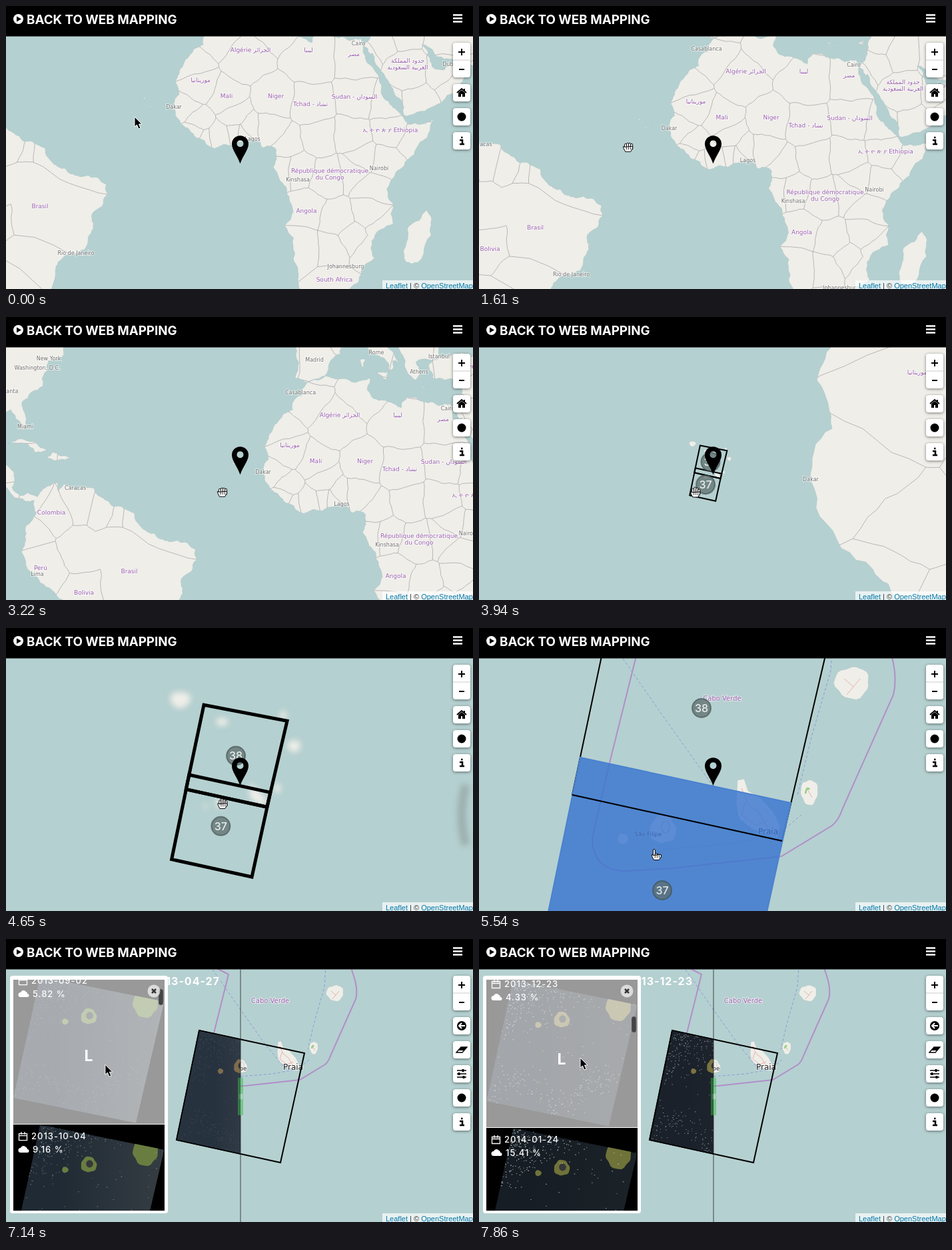
Recreate the animation shown at these times as an HTML page. Size 701x424 px, loop 8 s.

```html
<!DOCTYPE html>
<html lang="en">
<head>
<meta charset="utf-8">
<title>Web mapping</title>
<style>
html, body { margin: 0; width: 100%; height: 100%; overflow: hidden; background: #b5d0d0; }
svg { display: block; }
text { font-family: "DejaVu Sans", "Noto Sans", sans-serif; }
.ui { font-family: Inter, "Open Sans", sans-serif; fill: #fff; }
.label { text-anchor: middle; paint-order: stroke; stroke: #fff; stroke-opacity: .6; stroke-width: 2px; }
#view path, #feet path { vector-effect: non-scaling-stroke; }
.land { fill: #efeee9; stroke: #a9c3c3; stroke-width: .5; }
.border { fill: none; stroke: #a3a09f; stroke-width: .7; }
.limit { fill: none; stroke: #b08fc9; stroke-width: 2; }
.ferry { fill: none; stroke: #8b9cdc; stroke-width: 1; stroke-dasharray: 4 3; }
.road { fill: none; stroke: #e3a59c; stroke-width: .8; }
.button { fill: #fff; filter: drop-shadow(0 1px 2px rgba(0,0,0,.5)); }
.icon { fill: none; stroke: #000; stroke-width: 2; }
.attr { font: 11px "Liberation Sans", Arial, sans-serif; }
</style>
</head>
<body>
<svg id="stage" width="701" height="424" viewBox="0 0 701 424"></svg>
<script>
const LOOP = 8000, STEP = 178.6;
const $ = id => document.getElementById(id);
const show = (id, on) => $(id).setAttribute("display", on ? "inline" : "none");
const mix = (a, b, p) => a + (b - a) * p;
const progress = (t, from, to) => Math.min(1, Math.max(0, (t - from) / (to - from)));

function random(seed) {
  return () => (seed = seed * 16807 % 2147483647) / 2147483647;
}

// World map: key points in degrees, projected to pixels of the widest zoom
const DEG = 2048 / 360;
function project(lon, lat) {
  const north = Math.log(Math.tan(Math.PI / 4 + lat * Math.PI / 360)) * 180 / Math.PI;
  return [351 + DEG * lon, 237 - DEG * north];
}
function points(text) {
  const n = text.split(" ").map(Number);
  return n.flatMap((v, i) => i % 2 ? [] : [project(v, n[i + 1])]);
}
const rnd = random(4242);
function rough(a, b, amp, depth = 3) {
  const dx = b[0] - a[0], dy = b[1] - a[1];
  if (!depth || Math.hypot(dx, dy) < 4) return [a];
  const k = (rnd() - .5) * amp;
  const mid = [(a[0] + b[0]) / 2 - dy * k, (a[1] + b[1]) / 2 + dx * k];
  return [...rough(a, mid, amp, depth - 1), ...rough(mid, b, amp, depth - 1)];
}
const path = list => "M" + list.map(p => p.map(v => v.toFixed(1)).join(" ")).join("L");

const coasts = {
  africa: `-6 35.8 -9.7 31.5 -9.6 30 -12.9 27.9 -16 23.7 -17 21 -16 18 -17.4 14.7 -16.8 12.4 -13.3 9 -11.5 6.9 -7.6 4.4 -4 5.2 -2 4.8 1 5.9 4.4 6.3 6 4.3 8.5 4.6 9.6 3.8 9.3 .5 8.8 -.8 12.2 -6 13.8 -11 11.8 -16 14.5 -22.8 15.3 -27 18.3 -34 20 -34.8 25.7 -34 31 -29.9 32.8 -26 35.5 -24 34.8 -19.8 40.5 -15.5 40.5 -10.5 38.8 -6.5 41.5 -1.8 46 2.5 49.5 7 51.2 11.8 44.5 10.4 43 12.5 39.6 15.5 37.3 19 35.5 24 32.6 29.8 32 31.3 29 30.9 25 31.7 20.5 32.8 19 30.4 15.5 31.8 11 33.3 10.2 34.2 10.8 37 3 36.8`,
  asia: `34.3 31.3 36 36.7 30.5 36.5 27.5 36.8 26.3 39.8 29 41 33 42 41 41.3 41 50 70 50 70 26 61 25.2 57 26 54 26.6 51 28.5 48 30 50.2 26.6 51.5 24.3 54 24.1 56.3 26 56.6 24.3 59.7 22.5 57.8 19 52.2 15.6 45 12.8 43.4 12.7 42.7 16.5 39.1 21.5 35 28 34.3 27.8 32.7 29.8`,
  europe: `29 41 26 40.8 23 40.3 24 38 23 36.5 21.3 37.5 19.5 41.5 14 45 12.3 45 13.6 43.5 18.4 40.2 16.8 40.5 17 39 15.8 38 15.7 40 12.5 41.6 8.8 44.4 6 43.1 3.1 43 3 41.8 -.2 39.3 -.5 38 -2 36.8 -5.5 36 -9 37 -8.8 43.2 -1.5 43.5 -1.5 48 29 48`,
  south: `-77 8.5 -75.5 10.5 -71.7 12.2 -71.5 10 -70 11.8 -62 10.7 -60 8.3 -57 6 -51.5 4.3 -50 1 -48 -.7 -44.5 -2.6 -40 -2.9 -35.3 -5.3 -34.9 -8 -39 -13 -39.2 -17.8 -41 -22 -44.5 -23.1 -48.5 -26 -52 -33 -70.5 -38 -70.3 -18.3 -76.2 -14 -81.2 -6 -80 -3 -80 .8 -77.3 4 -77.8 7.5 -80 7.3 -83 8.3 -87.5 13 -95 16 -95 18.5 -88 18 -83.3 15 -83.7 11 -81 8.8 -79.5 9.6`,
  north: `-67 45 -70 43.5 -70 41.6 -74 40.5 -75.7 37 -75.5 35.2 -81 31.8 -80 26.5 -80.6 25.2 -82.7 28 -84 30 -90 29.3 -97 28 -97 50 -67 50`,
  madagascar: "49.3 -12 50.5 -15.8 47 -25 44 -25 43.3 -22 44.4 -16.3",
  cuba: "-84.9 21.9 -82 23.1 -74.3 20.2 -77.7 19.9 -78 20.8",
  hispaniola: "-74.4 18.4 -73 19.9 -68.4 18.6 -71.5 17.8",
  sicily: "12.5 38 15.6 38.2 15.1 36.7", sardinia: "8.2 40.8 9.6 40.8 9 39",
  crete: "23.6 35.4 26.3 35.2 24.8 34.9", cyprus: "32.3 35 34.5 35.6 33.5 34.7"
};
const land = Object.values(coasts).map(text => {
  const p = points(text);
  return path(p.flatMap((a, i) => rough(a, p[(i + 1) % p.length], .3))) + "Z";
}).join("");

// Borders run halfway between the centres of neighbouring countries
const centres = {
  maghreb: "-6 32,-13 25,-11 20,1.5 27,9.5 34,18.5 27,31.5 27",
  sahel: "-4 17,9 16,18.5 15,31.5 17,38.5 15.5",
  west: "-14.5 14.5,-11 11,-12 8.5,-9.5 6.5,-5.5 7.5,-1 8,1 8,2.4 9,-1.5 12.5,8 9.5,12.5 5.5",
  east: "20.5 7,30 7.5,39.5 9,46 6,38 .5,32.5 1.5,35 -6.5,30 -2",
  south: "23 -3,15.5 -1,11.5 -1,17.5 -12,26 -14.5,34 -13,37 -16.5 34 -22,30 -19,24 -22,17 -22,24 -30,47 -19",
  asia: "44 24,47 15.5,57 20.5,54.5 23.7,43 33,37 31,54 32,38.5 35,34 39",
  europe: "22 39,13 42,-4 40,-12.6 40,3 46",
  america: "-73 4,-66 7,-59 5,-56 4,-53 4,-78.5 -1.5,-75 -9,-66 -5 -56 -3 -55 -16,-64.5 -17,-58 -23,-64 -29,-80 8.5,-84 10,-85 13,-82 36"
};
const sites = Object.values(centres).join(",").split(",").flatMap((text, id) => points(text).map(p => ({ p, id })));

function cut(cell, a, b, n) {
  const side = ({ p }) => Math.hypot(p[0] - a[0], p[1] - a[1]) ** 2 - Math.hypot(p[0] - b[0], p[1] - b[1]) ** 2;
  return cell.flatMap((v, i) => {
    const w = cell[(i + 1) % cell.length], s = side(v), e = side(w), out = s <= 0 ? [v] : [];
    if (s <= 0 !== e <= 0) {
      const k = s / (s - e);
      out.push({ p: v.p.map((c, j) => mix(c, w.p[j], k)), n: s <= 0 ? n : v.n });
    }
    return out;
  });
}
const borders = sites.flatMap((site, i) => {
  let cell = [[-400, -200], [1000, -200], [1000, 700], [-400, 700]].map(p => ({ p, n: -1 }));
  sites.forEach((other, j) => { if (j !== i) cell = cut(cell, site.p, other.p, j); });
  return cell.flatMap((v, k) => {
    const end = cell[(k + 1) % cell.length].p;
    return v.n > i && sites[v.n].id !== site.id ? path([...rough(v.p, end, .15), end]) : [];
  });
}).join("");

// Local map units are pixels of the scene view
const local = (x, y) => [16 * x - 3048, 16 * y - 2226];
const limit = "M309 40L334 53 312 141 299 197Q299 222 325 222L359 220 441 211 479 188Q484 184 487 175L525 90Q528 78 524 62L517 40";
const ferries = "M306 40L350 103 390 159 420 195M480 40L478 72 464 120 453 165M352 206L400 202 438 195 456 180";
const foot = { 37: "M290 137L448 171 412 335 256 301Z", 38: "M318.7 1.3L480.6 32.4 441.5 199.5 284 165Z" };

function blob(cx, cy, rx, ry) {
  const ring = Array.from({ length: 28 }, (_, i) => {
    const a = i / 28 * 2 * Math.PI, r = 1 + .06 * Math.sin(3 * a + cx) + .04 * Math.sin(7 * a + cy);
    return [cx + rx * r * Math.cos(a), cy + ry * r * Math.sin(a)];
  });
  return path(ring) + "Z";
}
const fogo = blob(352, 191, 10, 10.5), brava = blob(322, 198, 4, 4);
const santiago = "M408 154L413 153 416 162 425 167 435 178 440 188 438 198 430 195 420 191 409 183 407 172Z";
const isles = fogo + brava + santiago + blob(462, 163, 6.5, 9.5) + blob(494, 81, 13, 12)
  + blob(273, -9, 20, 16) + blob(354, 34, 12, 8) + blob(473, 21, 7, 8);

const countries = [[367, 67, "Algérie الجزائر"], [454, 67, "ليبيا"], [522, 73, "مصر"], [603, 83, "حدود المملكة"], [603, 93, "العربية السعودية"],
  [292, 112, "موريتانيا"], [331, 136, "Mali"], [405, 136, "Niger"], [457, 148, "Tchad - تشاد"], [523, 137, "Sudan - السودان"],
  [577, 187, "ኢ ት ዮ ጵ ያ Ethiopia"], [486, 248, "République démocratique"], [486, 258, "du Congo"], [451, 308, "Angola"], [493, 411, "South Africa"],
  [51, 301, "Brasil"], [-17, 333, "Bolivia"], [-82, 296, "Perú"], [-66, 213, "Colombia"], [554, -6, "Türkiye"]];
const cities = [[529, 57, "Cairo"], [667, 88, "Dubai"], [252, 152, "Dakar"], [370, 200, "Lagos"], [560, 244, "Nairobi"], [438, 261, "Kinshasa"],
  [105, 371, "Rio de Janeiro"], [510, 391, "Johannesburg"], [329, -16, "Madrid"], [422, -27, "Rome"], [516, -21, "Istanbul"], [486, 2, "Athens"],
  [308, 33, "Casablanca"], [-70, -18, "New York"], [-87, -4, "Washington, D.C."], [-105, 84, "Miami"], [-30, 176, "Caracas"],
  [-87, 305, "Lima"], [-130, 31, "Atlanta"]];
const wide = (list, size, color) => list.map(([x, y, s]) => ({ p: local(x, y), s, size, color, wide: true }));
const labels = [
  ...wide(countries, 9, "#9a5fae"), ...wide(cities, 8, "#707070"),
  { p: [396.5, 93], s: "Cabo Verde", size: 10, color: "#a05fb0" },
  { p: [341, 195], s: "São Filipe", size: 8.5, color: "#222" },
  { p: [431, 193], s: "Praia", size: 12, color: "#222" }
];

// Satellite scenes
const scenes = [
  { date: "2013-04-27", cloud: "2.72", isle: "#7d6c4c", haze: .15 },
  { date: "2013-09-02", cloud: "5.82", isle: "#64803f", haze: .2 },
  { date: "2013-10-04", cloud: "9.16", isle: "#6a7d40", haze: .4 },
  { date: "2013-11-21", cloud: "7.05", isle: "#75763f", haze: .5 },
  { date: "2013-12-23", cloud: "4.33", isle: "#7a7440", haze: .6 },
  { date: "2014-01-24", cloud: "15.41", isle: "#6f7339", haze: .7 }
];
function clouds(seed) {
  const next = random(seed * 977 + 31);
  let d = "";
  for (let i = 0; i < 3500; i++) {
    const x = 256 + 192 * next(), y = 137 + 198 * next();
    const north = 1.2 - (x - 256 + 1.6 * (y - 137)) / 150;
    const south = .5 - Math.abs(y - 290 - 18 * Math.sin(x / 17)) / 50;
    if (Math.max(north, south, .03) > next()) d += `M${x.toFixed(1)} ${y.toFixed(1)}h${(.7 + next()).toFixed(1)}`;
  }
  return d;
}
const scene = (s, i) => `<g clip-path="url(#foot)">
  <path d="${foot[37]}" fill="hsl(212 24% ${20 - 1.7 * i}%)"/><path d="${foot[37]}" fill="url(#sheen)" opacity="${1 - .17 * i}"/>
  <path d="${fogo}${brava}${blob(424, 175, 16, 17)}" fill="${s.isle}"/>
  <ellipse cx="353" cy="190" rx="4.500" ry="5" fill="#35373a"/>
  <path d="${clouds(i + 1)}" stroke="#cfd8d4" opacity="${s.haze}"/></g>`;

const thumb = (s, i) => `<g transform="translate(0 ${222 * i})">
  <rect x="11" y="61" width="227" height="221"/>
  <g transform="translate(11 61) scale(1.18 1.11) translate(-256 -137)">${scene(s, i)}</g>
  <g id="over${i}"><rect x="11" y="61" width="227" height="221" fill="#fff" opacity=".6"/>
    <text class="ui" x="124" y="188" font-size="23" font-weight="700" text-anchor="middle">L</text></g>
  <rect x="11" y="282" width="227" height="1" fill="#fff"/>
  <g id="info${i}"><path d="M19.500 74.500h12v10h-12zM19.500 77.500h12M23 72v4M28 72v4" fill="none" stroke="#fff" stroke-width="1.300"/>
    <path d="M22 103a3.500 3.500 0 0 1 0-7a4.500 4.500 0 0 1 8-1a3 3 0 0 1 2 3a2.500 2.500 0 0 1 0 5z" fill="#fff"/>
    <g font-size="13" font-weight="500" letter-spacing="1"><text x="38" y="83" class="ui">${s.date}</text>
    <text x="40" y="103" class="ui">${s.cloud} %</text></g></g></g>`;

const icons = {
  home: `<path d="M-7 0L0-6 7 0M4-6v3"/><path d="M-5 0L0-4 5 0V6H1V2H-1V6H-5z" fill="#000" stroke="none"/>`,
  dot: `<circle r="6.500" fill="#000" stroke="none"/>`,
  info: `<path d="M-3-1H1V5M-3 5H4M-1-5H1.500" stroke-width="2.500"/>`,
  back: `<circle r="7" fill="#000" stroke="none"/><path d="M5 0H-3M0-4L-4 0 0 4" stroke="#fff"/>`,
  eraser: `<path d="M-8 4L-1-4H8L1 4z" stroke-width="1.300"/><path d="M-5 1L-1-4H8L4 1z" fill="#000" stroke="none"/>`,
  sliders: `<path d="M-7-5H7M-7 0H7M-7 5H7" stroke-width="1.500"/><path d="M2-7v4M-4-2v4M3 3v4" stroke-width="3"/>`
};
const tools = names => names.map((n, i) => `<rect class="button" x="671" y="${117 + 36 * i}" width="26" height="26" rx="4"/>
  <g class="icon" transform="translate(684 ${130 + 36 * i})">${icons[n]}</g>`).join("");

const fingers = tops => tops.map((y, i) => `<rect x="${3 * i - 5}" y="${y}" width="3" height="${4 - y}" rx="1.500"/>`).join("")
  + `<path d="M-5 0L-7-1-7 1-4 7H4L7 2V-1z"/><path d="M-2 0v4M1 0v4M4 0v4" stroke-width=".8"/>`;
const cursors = {
  arrow: `<path d="M0 0V15L3.500 12 6 18 9 17 6.500 11H11z" fill="#000" stroke="#fff"/>`,
  open: fingers([-6, -8, -7, -5]),
  fist: fingers([-5, -6, -6, -5]),
  pointer: fingers([-9, -3, -2, -1])
};

$("stage").innerHTML = `
<defs>
  <clipPath id="foot"><path d="${foot[37]}"/></clipPath>
  <clipPath id="ground"><path d="${land}"/></clipPath>
  <clipPath id="left"><rect x="0" y="46" width="352" height="378"/></clipPath>
  <clipPath id="list"><rect x="11" y="61" width="227" height="346"/></clipPath>
  <linearGradient id="sheen"><stop offset=".3" stop-color="#8a8a80" stop-opacity="0"/><stop offset="1" stop-color="#8a8a80" stop-opacity=".3"/></linearGradient>
</defs>
<rect width="701" height="424" fill="#b5d0d0"/>
<g id="soft"><g id="view">
  <g transform="translate(-3048 -2226) scale(16)"><path class="land" d="${land}"/>
    <g clip-path="url(#ground)"><path class="border" d="${borders}"/></g></g>
  <path class="land" d="${isles}"/>
  <g id="detail"><path class="limit" d="${limit}"/><path class="ferry" d="${ferries}"/>
    <path class="road" d="M411 160L416 172 424 178 433 194M414 170L411 180 422 188 431 184M488 78L495 84 500 78M495 84L490 90M460 160L464 167"/>
    <path d="M459 164Q460 158 462 161" fill="none" stroke="#98cf82" stroke-width="2.500"/>
    <ellipse cx="354" cy="189" rx="3" ry="4.500" fill="none" stroke="#bbb" stroke-width=".6"/></g>
</g><path id="smear" d="M690 235Q678 280 690 325" fill="none" stroke="#8d9999" stroke-width="13" opacity=".6"/></g>
<g>${labels.map((l, i) => `<text id="l${i}" class="label" font-size="${l.size}" fill="${l.color}">${l.s}</text>`).join("")}</g>
<g id="feet"><path id="foot38" d="${foot[38]}" fill="none" stroke="#000"/><path id="foot37" d="${foot[37]}" fill-opacity=".8"/>
  <path id="edge38" d="M284 165L441.500 199.500" stroke="#000"/></g>
<g id="hero" clip-path="url(#left)"><g id="heroA">${scene(scenes[0], 0)}</g><g id="heroB">${scene(scenes[4], 4)}</g>
  <path d="${foot[37]}" fill="none" stroke="#000" stroke-width="1.500"/></g>
${[37, 38].map(n => `<g id="count${n}"><circle r="14" fill="#5e6d6e" fill-opacity=".75" stroke="#3f4b4c" stroke-opacity=".6" stroke-width="2"/>
  <text class="ui" y="6" font-size="16" font-weight="500" text-anchor="middle" opacity=".85">${n}</text></g>`).join("")}
<path id="pin" transform="translate(.5 -.8)" d="M351 237C347 225 338.500 216 338.500 207.500A12.500 12.500 0 0 1 363.500 207.500C363.500 216 355 225 351 237ZM351 202a5 5 0 1 0 .01 0z" fill-rule="evenodd"/>
<g id="slider"><g id="split"><rect x="351" y="46" width="2" height="378" fill="#222"/>
  <rect x="348" y="208" width="8" height="56" fill="#1fb32e"/><rect x="348" y="208" width="3" height="56" fill="#43d34f"/>
  <path d="M350.500 232v8M352.500 232v8M354.500 232v8" stroke="#fff"/></g>
  <path id="arrows" d="M330 230v14l-8-7zM371 230v14l8-7z" fill="#fff"/></g>
<text id="title" class="ui" x="321" y="69" font-size="16" font-weight="700" letter-spacing="1" text-anchor="end"></text>
<g id="panel"><rect x="6" y="55" width="237" height="356" rx="4" fill="#fff"/><rect x="11" y="61" width="227" height="346"/>
  <g clip-path="url(#list)"><g id="thumbs">${scenes.map(thumb).join("")}</g></g>
  <rect id="bar" x="229" width="7" height="24" rx="3.500" fill="#444" stroke="#888" stroke-width=".5"/>
  <g id="close"><circle cx="222" cy="78" r="9.500" fill="#fff"/><path d="M219 75l6 6M225 75l-6 6" stroke="#000" stroke-width="2.500"/></g></g>
<rect width="701" height="45.500"/>
<circle cx="18.500" cy="19.500" r="7.500" fill="#fff"/><path d="M16 15.500v8l7-4z"/>
<text class="ui" x="31" y="26.500" font-size="18.800" font-weight="700">BACK TO WEB MAPPING</text>
<path d="M671 13.500h14M671 18.500h14M671 23.500h14" stroke="#fff" stroke-width="2.300"/>
<rect class="button" x="671" y="55" width="26" height="52" rx="4"/><path d="M671 81h26" stroke="#ccc"/>
<path class="icon" d="M679 69h10M684 64v10M680 95h8"/>
<g id="toolsA">${tools(["home", "dot", "info"])}</g><g id="toolsB">${tools(["back", "eraser", "sliders", "dot", "info"])}</g>
<rect x="565" y="411" width="136" height="13" fill="#fff" opacity=".7"/>
<text class="attr" x="570" y="423" fill="#333"><tspan fill="#0078a8">Leaflet</tspan> | © <tspan fill="#0078a8">OpenStreetMap</tspan></text>
<g id="cursor">${Object.entries(cursors).map(([k, v]) => `<g id="${k}" fill="#fff" stroke="#000">${v}</g>`).join("")}</g>`;

// Motion
function panAt(t) {
  const left = 1 - progress(t, 1430, 3215);
  return [134 * (1 - left ** 2.75), 81 * (1 - left ** 4.75)];
}

function viewAt(t) {
  if (t >= 5000) {
    const u = 1 - progress(t, 5715, 6070);
    return [1 + u, -428 * u, -80 * u];
  }
  const s = 2 ** (-4 + 2 * progress(t, 3215, 3930) + 3 * progress(t, 4108, 5000) ** 1.2);
  const [dx, dy] = panAt(t), k = s - 1 / 16;
  return [s, 190.5 + dx - 385.5 * k, 139 + dy - 149 * k];
}

// Pointer path, carried along by the pan
const trail = [[0, 193, 166], [180, 193, 166], [540, 186, 168], [890, 180, 161], [1070, 190, 179], [5000, 191, 183],
  [5540, 132, 260], [5720, 130, 257], [6250, 11, 120], [7860, 18, 97], [LOOP, 18, 97]];
function pointerAt(t) {
  const i = trail.findIndex(k => k[0] > t), a = trail[i - 1], b = trail[i];
  const p = progress(t, a[0], b[0]), [dx, dy] = panAt(t);
  return [mix(a[1], b[1], p) + dx, mix(a[2], b[2], p) + dy];
}
const pointerKind = t => t < 1065 ? "arrow" : t < 1600 ? "open" : t < 3390 ? "fist" : t < 5350 ? "open" : t < 6060 ? "pointer" : "arrow";

function drawMap(t) {
  const [s, x, y] = viewAt(t);
  const place = (id, [px, py], dy = 0) => $(id).setAttribute("transform", `translate(${s * px + x} ${s * py + y + dy})`);
  const deep = t > 4200 && t < 5000, blur = deep || t > 3300 && t < 3900;
  for (const id of ["view", "feet"]) $(id).setAttribute("transform", `translate(${x} ${y}) scale(${s})`);
  $("soft").style.filter = blur ? `blur(${deep ? 4 : 1}px)` : "none";
  show("smear", t > 4600 && t < 4800);
  show("detail", t >= 5000);
  labels.forEach((l, i) => {
    show("l" + i, l.wide ? t < 4200 && !blur : t >= 5000);
    place("l" + i, l.p, l.size * .28);
  });

  const hover = t > 5500 && t < 5890, both = t > 3900 && t < 5890;
  show("feet", t > 3900);
  $("feet").style.filter = deep ? "blur(.7px)" : "none";
  for (const id of ["foot38", "edge38", "count37", "count38"]) show(id, both);
  for (const id of ["foot38", "foot37", "edge38"]) $(id).setAttribute("stroke-width", deep ? Math.min(8 * s, 5) : 2);
  $("foot37").setAttribute("fill", hover ? "#3775d0" : "none");
  $("foot37").setAttribute("stroke", hover ? "#4a82d0" : "#000");
  place("count37", [351.5, 236.5]);
  place("count38", [381, 100]);
}

function drawPanel(t) {
  const open = t > 6060, dim = t > 6600, loaded = t > 6780, late = t > 7850;
  const scroll = 888 * progress(t, 6780, 7500) ** 2;
  const hovered = t > 6420 ? Math.floor((190 + scroll - 61) / 222) : -1;
  for (const id of ["pin", "toolsA"]) show(id, !open);
  for (const id of ["panel", "slider", "toolsB"]) show(id, open);
  for (const id of ["hero", "title"]) show(id, loaded);
  show("heroA", !late);
  show("heroB", late);
  $("title").textContent = scenes[late ? 4 : 0].date;
  $("split").setAttribute("opacity", dim ? .4 : 1);
  show("arrows", !dim);
  $("thumbs").setAttribute("transform", `translate(0 ${-scroll})`);
  scenes.forEach((s, i) => {
    show("over" + i, i === hovered);
    $("info" + i).setAttribute("transform", `translate(0 ${i === hovered ? -11 : 0})`);
  });
  $("close").setAttribute("opacity", hovered >= 0 ? .65 : 1);
  show("bar", scroll > 0);
  $("bar").setAttribute("y", 61 + scroll * .062);
}

function drawCursor(t) {
  for (const k in cursors) show(k, k === pointerKind(t));
  $("cursor").setAttribute("transform", `translate(${pointerAt(t).join(" ")})`);
}

const start = performance.now();
function tick() {
  const now = (performance.now() - start) % LOOP;
  const t = Math.floor((now + 4) / STEP) * STEP;
  drawMap(t);
  drawPanel(t);
  drawCursor(t);
  requestAnimationFrame(tick);
}
tick();
</script>
</body>
</html>
```
